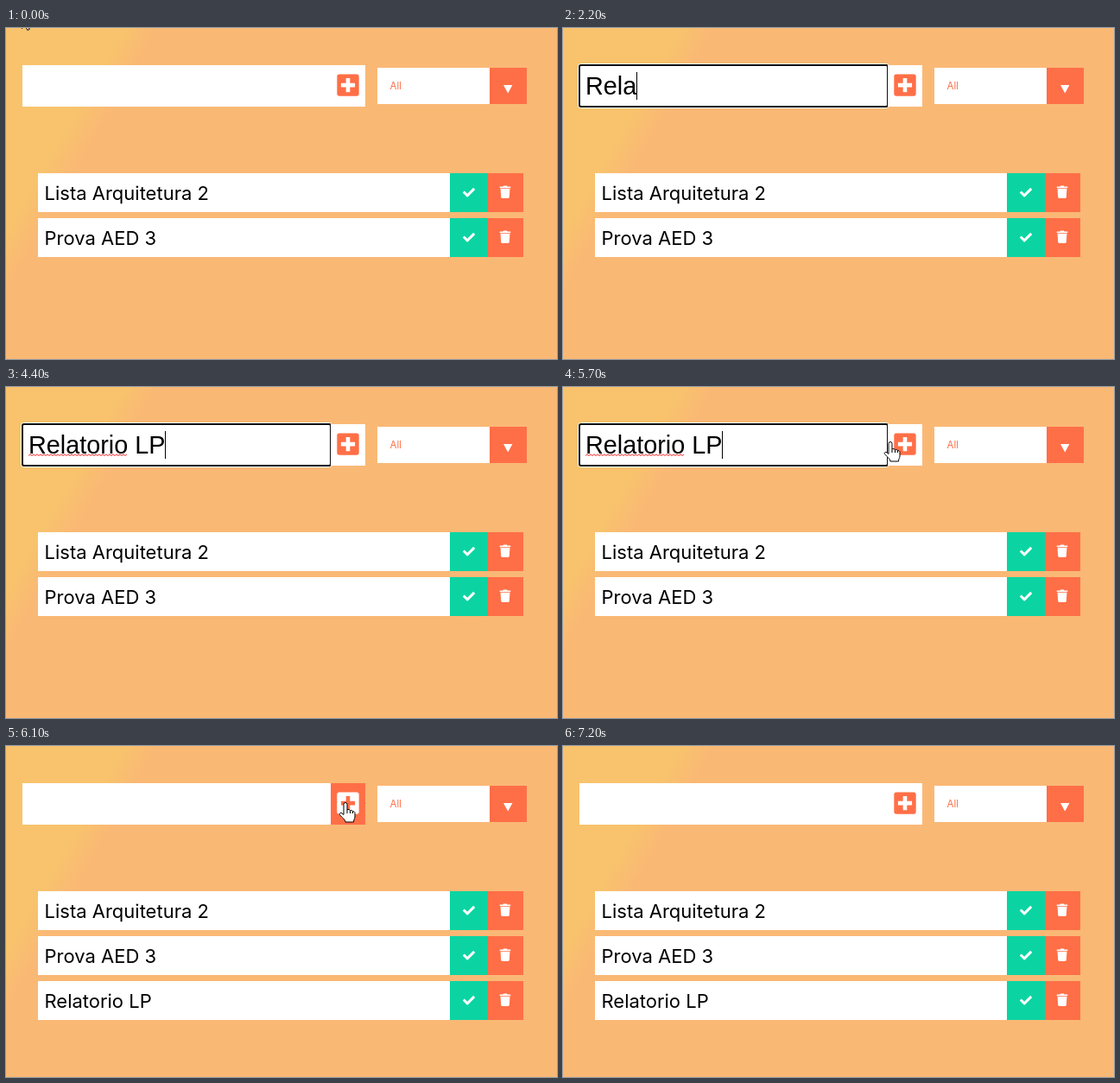
These frames come from a looping animation (638 px wide and 383 px high, 7.6 s). An HTML page:

```html
<!DOCTYPE html>
<html lang="pt">
<head>
<meta charset="utf-8">
<title>Lista de tarefas</title>
<style>
  html, body { margin: 0; width: 100%; height: 100%; overflow: hidden; }
  body { background: linear-gradient(120deg, #f8c36c 16%, #fab875 20.5%); }
  svg { display: block; width: 638px; height: 383px; }
  text { white-space: pre; }
  .task { font: 22px Inter, sans-serif; }
  .filter { font: 11.5px Inter, sans-serif; fill: #ff6f47; }
  #typed { font: 28.8px "Liberation Sans", Arial, sans-serif; }
  .cursor { fill: #fff; stroke: #000; stroke-linejoin: round; }
</style>
</head>
<body>
<svg viewBox="0 0 638 383">
  <defs>
    <g id="row">
      <path fill="#fff" d="M37 0h477v45H37z"/>
      <path fill="#0bd4a2" d="M514 0h44v45h-44z"/>
      <path fill="#ff6f47" d="M558 0h41v45h-41z"/>
      <path fill="none" stroke="#fff" stroke-width="2.9" stroke-linejoin="round" d="M529.8 21.5l4.4 4.4 8-8"/>
      <g fill="#fff" transform="translate(571.7 14.5) scale(.0281)">
        <path d="M432 32H312L296 0H152l-16 32H16Q0 32 0 48v32q0 16 16 16h416q16 0 16-16V48q0-16-16-16zM32 128l21 339q3 45 48 45h246q45 0 48-45l21-339z"/>
      </g>
    </g>
  </defs>

  <path fill="#fff" d="M19 43h357v48H19zM430 46h130v42H430z"/>
  <g id="ring" fill="none">
    <rect x="17.5" y="41.5" width="360" height="51" rx="3" stroke="#fff"/>
    <rect x="19" y="43" width="357" height="48" rx="2" stroke="#101010" stroke-width="2"/>
  </g>
  <text id="typed" x="26" y="77"></text>
  <path id="squiggle" fill="none" stroke="#f22"/>
  <rect id="caret" y="51" width="1" height="32"/>

  <rect id="button" x="376" y="43" width="40" height="48"/>
  <rect id="box" x="383.3" y="53.4" width="25.4" height="25.4" rx="2.7"/>
  <path id="plus" stroke-width="4.6" d="M387.9 66.1h16.2M396 58v16.2"/>

  <path fill="#ff6f47" d="M560 46h43v42h-43z"/>
  <path fill="#fff" d="M576 66h10.4l-5.2 9.4z"/>
  <text class="filter" x="444.5" y="71">All</text>

  <g id="rows"></g>

  <path id="arrow" class="cursor" d="M.5.5v16l3.8-3.6 2.5 5.6 2.4-1-2.5-5.4h5.2z"/>
  <path id="hand" class="cursor" d="M-1 2.5a2 2 0 0 1 4 0V9c1-1 3-.7 3.5.8 1-.8 2.8-.4 3 1 1.2-.5 2.5.2 2.5 1.8V17c0 2-1.5 3-1.5 6H1C1 20-3 18-5.5 14.5c-1-1.5 1-3 2.5-1.7L-1 14.5zM3 9v4M6.5 10v3M9.5 11v2"/>
</svg>
<script>
const LOOP = 7600, STEP = 100, BLINK = 500;
const FOCUS = 700, SPELLCHECK = 3900, PRESS = 6000, ADDED = 6100;
const ENTRY = 'Relatorio LP';

// [time, letters typed so far]
const keys = [[FOCUS, 0], [1400, 1], [1700, 2], [2200, 4], [2600, 5], [2800, 6],
  [3400, 7], [3500, 8], [3600, 9], [3900, 10], [4200, 11], [4400, 12]];

// [time, pointer shape, x, y]
const pointer = [[0, 'arrow', 18, -16], [300, 'arrow', 50, 10], [400, ''],
  [5400, 'arrow', 260, 25], [5500, ''],
  [5700, 'hand', 378, 63], [5800, 'hand', 385, 64], [5900, 'hand', 392, 65],
  [6800, 'hand', 384, 62], [7000, 'arrow', 340, 22], [7100, 'arrow', 300, -8], [7200, '']];

const $ = id => document.getElementById(id);
const set = (id, name, value) => $(id).setAttribute(name, value);
const show = (id, on) => set(id, 'visibility', on ? 'visible' : 'hidden');
const latest = (list, t) => list.filter(entry => entry[0] <= t).pop();
const ramp = (t, start) => Math.min(1, Math.max(0, (t - start) / 300));
const mix = k => `rgb(255,${255 - 144 * k},${255 - 184 * k})`;

$('rows').innerHTML = ['Lista Arquitetura 2', 'Prova AED 3', ENTRY].map((label, i) =>
  `<g id="task${i}" transform="translate(0 ${168 + 52 * i})"><use href="#row"/>` +
  `<text class="task" x="44.5" y="30.5">${label}</text></g>`).join('');

let wave = 'M26 79.5';
for (let x = 28, i = 0; x <= 141; x += 2, i++) wave += `L${x} ${i % 2 ? 79.5 : 77.8}`;
set('squiggle', 'd', wave);

function draw(t) {
  const focused = t >= FOCUS && t < PRESS;
  const [keyTime, count] = latest(keys, t) || [0, 0];
  const text = t < ADDED ? ENTRY.slice(0, count) : '';
  if ($('typed').textContent !== text) $('typed').textContent = text;
  const width = text ? $('typed').getComputedTextLength() : 0;
  set('caret', 'x', Math.floor(26 + width));
  show('caret', focused && Math.floor((t - keyTime) / BLINK) % 2 === 0);
  show('ring', focused);
  show('squiggle', t >= SPELLCHECK && focused);
  show('task2', t >= ADDED);

  const hover = ramp(t, 5700) - ramp(t, 6900);
  set('button', 'fill', mix(hover));
  set('box', 'fill', mix(1 - hover));
  set('plus', 'stroke', mix(hover));

  const [, shape, x, y] = latest(pointer, t);
  for (const id of ['arrow', 'hand']) show(id, id === shape);
  if (shape) set(shape, 'transform', `translate(${x} ${y})`);
}

const start = performance.now();
function tick() {
  const t = (performance.now() - start) % LOOP;
  draw(Math.floor(t / STEP) * STEP);
  requestAnimationFrame(tick);
}
tick();
</script>
</body>
</html>
```
